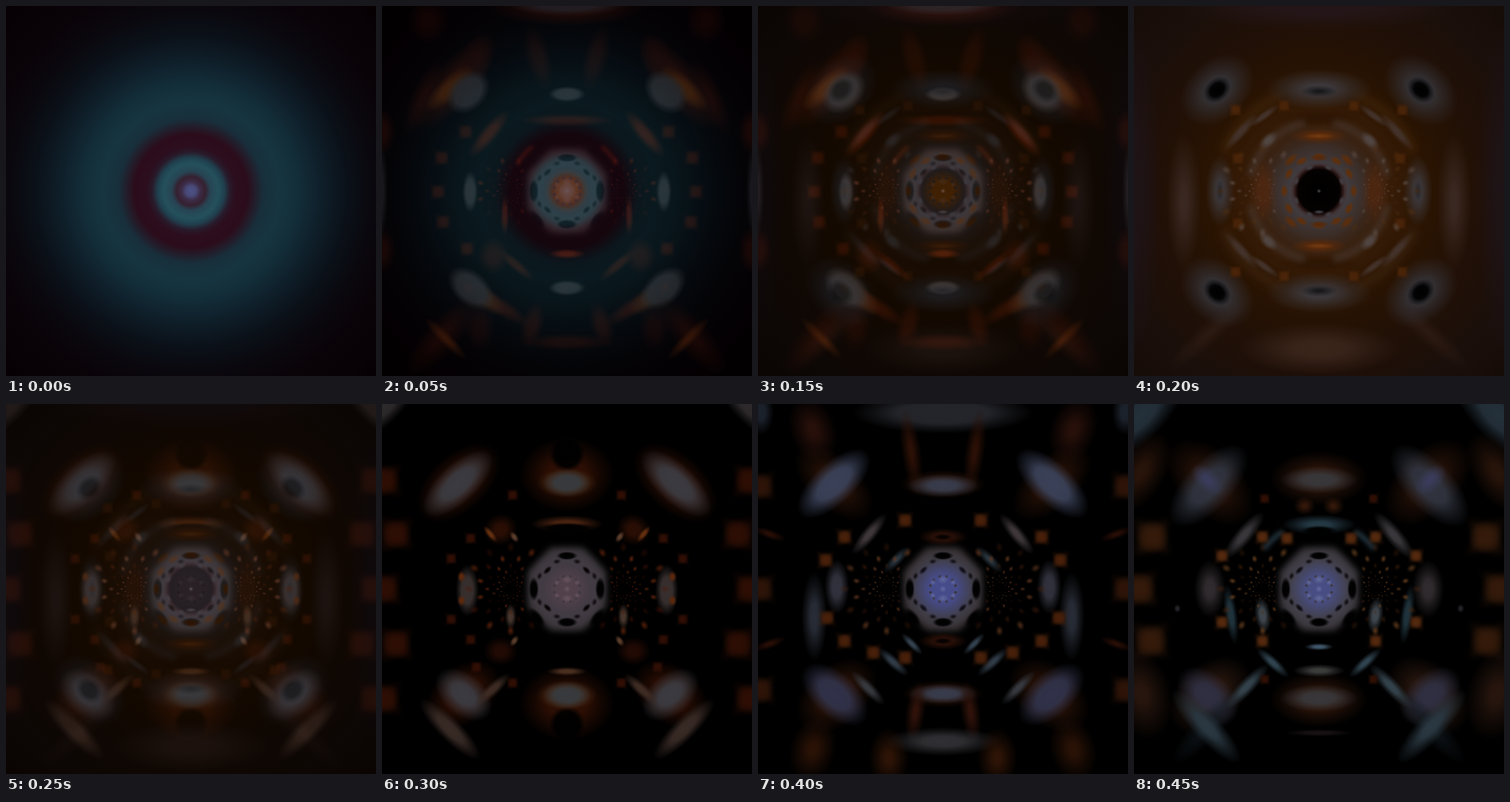
An HTML page with a canvas that plays this animation: 512 by 512 pixels, repeating every 500 ms.

```html
<!DOCTYPE html>
<html lang="en">
<head>
<meta charset="utf-8">
<title>Kaleidoscope pulse</title>
<style>
  html, body { margin: 0; width: 100%; height: 100%; overflow: hidden; background: #000; }
  canvas { display: block; width: 100vw; height: 100vh; }
</style>
</head>
<body>
<canvas id="stage" width="512" height="512"></canvas>
<script>
const SIZE = 512, MID = 256, STEP = 50;
const stage = document.getElementById('stage').getContext('2d');
let ctx;

// Coordinates are relative to the centre; everything off the axis is mirrored left to right.
function mirror(x, y, paint) {
  for (const side of x ? [1, -1] : [1]) {
    ctx.save();
    ctx.translate(MID + side * x, MID + y);
    ctx.scale(side, 1);
    paint();
    ctx.restore();
  }
}

// Fades smoothly from the core to the unit circle.
function glow(color, core) {
  const g = ctx.createRadialGradient(0, 0, 0, 0, 0, 1);
  g.addColorStop(0, color);
  g.addColorStop(core, color + 'f0');
  g.addColorStop((1 + core) / 2, color + '70');
  g.addColorStop(1, color + '00');
  return g;
}

function soft(x, y, rx, ry, deg, color, core = 0.35) {
  mirror(x, y, () => {
    ctx.rotate(deg * Math.PI / 180);
    ctx.scale(rx, ry);
    ctx.fillStyle = glow(color, core);
    ctx.beginPath();
    ctx.arc(0, 0, 1, 0, 7);
    ctx.fill();
  });
}

function quad(x, y, rx, ry, deg, color, core) {
  soft(x, y, rx, ry, deg, color, core);
  soft(x, -y, rx, ry, -deg, color, core);
}

function star(x, y, r, color) {
  mirror(x, y, () => {
    ctx.filter = `blur(${r * 0.12}px)`;
    ctx.scale(r, r);
    ctx.fillStyle = glow(color, 0.25);
    ctx.beginPath();
    ctx.moveTo(0.8, -0.8);
    for (const [px, py] of [[0.8, 0.8], [-0.8, 0.8], [-0.8, -0.8], [0.8, -0.8]]) {
      ctx.quadraticCurveTo((px + (px === py ? 0.8 : -0.8)) * 0.12, py * 0.12, px, py);
    }
    ctx.fill();
  });
  soft(x, y, r * 0.6, r * 0.6, 0, color, 0.1);
}

const stars = (points, r, color) => points.forEach(([x, y]) => star(x, y, r, color));

function arc(r, from, to, width, color) {
  mirror(0.001, 0, () => {
    ctx.filter = `blur(${width / 2}px)`;
    ctx.strokeStyle = color;
    ctx.lineWidth = width;
    ctx.beginPath();
    ctx.arc(0, 0, r, from * Math.PI / 180, to * Math.PI / 180);
    ctx.stroke();
  });
}

function backdrop(stops) {
  const g = ctx.createRadialGradient(MID, MID, 0, MID, MID, 362);
  for (const [r, color] of stops) g.addColorStop(r / 362, color);
  ctx.fillStyle = g;
  ctx.fillRect(0, 0, SIZE, SIZE);
}

// Rings of flecks around a pole on each side, uneven in brightness.
function poles(color, bright, reach = 7) {
  for (let k = 0; k < reach; k++) {
    const r = 10 * 1.34 ** k, size = Math.max(1.5, r * 0.12);
    for (let i = 0; i < 12; i++) {
      const a = (i + k % 2 / 2) * Math.PI / 6;
      const x = 78 + r * Math.cos(a), y = r * Math.sin(a);
      if (Math.hypot(x, y) < 62) continue;
      const noise = Math.abs(Math.sin(i * 12.9 + k * 78.2) * 437.5) % 1;
      ctx.globalAlpha = 0.15 + 0.65 * noise;
      soft(x, y, size * 1.1, size * 0.8, a * 180 / Math.PI, noise > 0.6 ? bright : color, 0.15);
    }
  }
  ctx.globalAlpha = 1;
}

// Hazy octagon with dark windows and a mottled eye.
function hub(rim, body, eye, eyeSize, fleck) {
  mirror(0, 0, () => {
    const g = ctx.createRadialGradient(0, 0, 15, 0, 0, 66);
    g.addColorStop(0, body);
    g.addColorStop(0.5, body);
    g.addColorStop(0.8, rim);
    g.addColorStop(1, rim + '60');
    ctx.filter = 'blur(4px)';
    ctx.fillStyle = g;
    ctx.beginPath();
    for (let i = 0; i < 8; i++) {
      const a = (i + 0.5) * Math.PI / 4;
      ctx.lineTo(59 * Math.cos(a), 63 * Math.sin(a));
    }
    ctx.fill();
  });
  soft(0, -46, 15, 6, 0, '#000000', 0.6);
  soft(0, 46, 15, 7, 0, '#000000', 0.6);
  soft(46, 0, 7, 17, 0, '#000000', 0.6);
  soft(42, 40, 8, 17, 38, '#000000', 0.5);
  quad(27, 26, 8, 4, -45, '#080404', 0.4);
  quad(38, 18, 4, 6, 20, '#100c0e', 0.2);
  quad(14, 38, 6, 4, -10, '#100c0e', 0.2);
  soft(0, 0, eyeSize, eyeSize, 0, eye, 0.45);
  for (let i = 0; i < 12; i++) {
    const a = (i + 0.5) * Math.PI / 6;
    soft(18 * Math.cos(a) || 0.01, 18 * Math.sin(a), 2.5, 2.5, 0, i % 2 ? rim : body, 0.2);
  }
  ctx.globalAlpha = 0.7;
  quad(0, 13, 8, 6, 0, fleck, 0.2);
  quad(14, 9, 4, 4, 0, fleck, 0.2);
  soft(0, 0, 5, 5, 0, fleck, 0.2);
  ctx.globalAlpha = 1;
}

// Black pupil with a scalloped edge inside pale rings.
function pupil(pale, dark, edge) {
  soft(0, 0, 70, 68, 0, pale, 0.55);
  for (let i = 0; i < 12; i++) {
    const a = i * Math.PI / 6;
    soft(48 * Math.cos(a) || 0.01, 48 * Math.sin(a), 9, 5, 90 + i * 30, dark, 0.3);
  }
  soft(0, 0, 40, 40, 0, edge, 0.7);
  soft(0, 0, 36, 37, 0, '#000000', 0.8);
  for (let i = 0; i < 8; i++) {
    const a = (i + 0.5) * Math.PI / 4;
    const x = 34 * Math.cos(a), y = 35 * Math.sin(a);
    if (x > 0) soft(x, y, 7, 4, 90 + (i + 0.5) * 45, pale, 0.3);
  }
  soft(0, 29, 8, 3, 0, pale);
  soft(0, 0, 3, 3, 0, pale);
}

function halo() {
  backdrop([
    [0, '#4c5286'], [7, '#484a78'], [13, '#3c2c46'], [20, '#35202f'], [27, '#274453'],
    [38, '#24505c'], [46, '#20404e'], [54, '#281a2a'], [62, '#2c0e1e'], [78, '#2c0c1b'],
    [88, '#241b29'], [100, '#182f3b'], [122, '#163540'], [148, '#132e39'], [178, '#0f202b'],
    [215, '#0b1119'], [255, '#0a070d'], [300, '#090207'], [362, '#070003']
  ]);
}

function embers() {
  backdrop([[0, '#000000'], [362, '#000000']]);
  const red = '#3a0e02', rust = '#2a0a02', amber = '#6a2e04', grey = '#3e3a3a';
  soft(0, -256, 110, 28, 0, red);
  soft(0, -258, 80, 15, 0, '#383438', 0.5);
  soft(258, 0, 10, 70, 0, '#2a2c30');
  quad(255, 82, 18, 32, 0, rust);
  soft(155, -150, 82, 30, 50, red, 0.3);
  soft(125, -182, 22, 40, -20, rust, 0.2);
  soft(198, -130, 18, 58, -25, rust, 0.2);
  soft(162, -142, 44, 16, 42, amber);
  soft(137, -137, 35, 26, 45, grey, 0.6);
  soft(95, 158, 52, 13, -32, red);
  soft(117, 146, 38, 16, -38, '#5a2a0c');
  soft(133, 135, 38, 24, -42, grey, 0.6);
  soft(136, 133, 10, 7, -42, '#4c3a32', 0.1);
  soft(172, 200, 70, 24, 48, rust, 0.2);
  soft(168, 204, 40, 9, -45, '#5c2404', 0.2);
  quad(0, 134, 26, 11, 0, grey, 0.6);
  soft(134, 1, 11, 29, 0, grey, 0.55);
  soft(0, -98, 66, 9, 0, red);
  soft(0, 87, 26, 7, 0, '#6a1e04');
  soft(108, -79, 42, 12, 50, '#501404');
  soft(71, 102, 34, 8, -40, red);
  arc(78, -52, -28, 5, '#4a1404');
  soft(86, 34, 6, 28, 0, '#4c1404');
  soft(0, 209, 66, 12, 0, rust);
  soft(48, 185, 16, 34, -15, rust);
  soft(40, -185, 18, 48, 15, '#200802');
  soft(192, -235, 28, 32, 0, '#1c0602');
  soft(121, 188, 22, 34, 0, '#1c0602');
  soft(102, 90, 22, 26, 0, rust);
  stars([[173, -46], [178, 1], [171, 43], [138, 80], [140, -82]], 17, red);
  poles('#3a0e02', '#5a1804', 6);
  hub('#443430', '#38353a', '#844204', 31, '#8a5a38');
}

function amberField() {
  backdrop([
    [0, '#3a2c28'], [65, '#3a2a22'], [95, '#381d08'], [150, '#2a1402'],
    [220, '#211006'], [300, '#1a0f0b'], [362, '#150b07']
  ]);
  const grey = '#3c393d', orange = '#58290a';
  soft(0, -256, 190, 34, 0, '#241618');
  soft(256, 0, 38, 230, 0, '#1e1316');
  soft(187, 15, 24, 96, 0, '#3a2822', 0.2);
  soft(0, 218, 110, 36, 0, '#3a251b', 0.3);
  soft(150, 195, 78, 16, 42, '#2c1a12', 0.1);
  arc(142, -68, -22, 12, '#3a2008');
  arc(142, 22, 68, 12, '#38200c');
  quad(0, 141, 74, 28, 0, grey, 0.25);
  quad(0, 138, 26, 8, 0, '#17171a', 0.2);
  quad(141, 140, 58, 42, -42, '#36363c', 0.25);
  quad(141, 140, 21, 16, -42, '#000000', 0.5);
  soft(137, 0, 20, 50, 0, grey, 0.25);
  soft(137, 0, 6, 16, 0, '#252326', 0.1);
  quad(0, 101, 62, 13, 0, '#2e1604');
  arc(96, -78, -12, 9, '#423127');
  arc(96, 12, 78, 9, '#423127');
  quad(0, 76, 40, 11, 0, orange);
  quad(0, 76, 22, 4, 0, '#713911', 0.2);
  soft(77, 0, 20, 46, 0, '#4c2610');
  quad(70, 70, 16, 9, -42, '#514642');
  quad(108, 82, 34, 8, -48, '#43322a');
  quad(76, 104, 26, 6, -36, '#43322a');
  stars([[112, -45], [112, 45], [115, -112], [115, 112], [48, 118], [48, -118]], 14, '#4a2408');
  poles('#55300f', '#5a4a42', 7);
  pupil('#403d42', '#5c300f', '#421008');
  quad(39, 43, 13, 6, -42, '#5a2d0c');
  quad(0, 46, 14, 5, 0, '#55290c');
}

function ashes() {
  backdrop([[0, '#000000'], [362, '#000000']]);
  const fringe = '#2e0f04', grey = '#3b3b41';
  soft(252, -252, 62, 22, 45, '#2e2a2b');
  stars([[252, -150], [236, -76], [252, 0], [236, 76], [252, 152]], 36, '#2e0e04');
  soft(150, -147, 70, 40, 42, fringe, 0.4);
  soft(151, -146, 62, 27, 43, grey, 0.45);
  soft(143, 146, 58, 40, 38, fringe, 0.4);
  soft(143, 146, 46, 29, -40, grey, 0.4);
  soft(162, 194, 58, 16, -45, '#382a25', 0.4);
  soft(103, 139, 32, 9, 42, '#3e2c24');
  quad(0, 158, 66, 52, 0, fringe, 0.4);
  quad(0, 187, 25, 25, 0, '#000000', 0.7);
  quad(0, 147, 42, 21, 0, '#482a12', 0.4);
  quad(0, 147, 34, 19, 0, '#373a3e', 0.5);
  soft(0, -90, 50, 12, 0, '#4c2411');
  soft(0, -84, 42, 8, 0, '#000000', 0.6);
  soft(0, 114, 28, 6, 0, '#4c3020');
  soft(138, 2, 16, 36, 0, '#38302f', 0.5);
  soft(146, -17, 6, 8, 0, '#5c280c');
  soft(146, 16, 6, 8, 0, '#5c280c');
  soft(92, -82, 24, 22, 30, '#2a0e04');
  soft(106, -76, 14, 5, -50, '#65300f');
  quad(73, 72, 5, 9, -35, '#5c3d2b');
  soft(78, 38, 8, 18, 0, '#48372e');
  soft(92, 86, 24, 20, 0, '#220a04');
  stars([[160, -42], [160, 42], [133, -70], [133, 70], [125, 108], [75, 130], [75, -130]], 13, '#300e04');
  poles('#4e1406', '#69270d');
  hub('#3a3639', '#423b44', '#52414b', 33, '#6c5963');
}

function violetField() {
  backdrop([
    [0, '#2b2935'], [65, '#2b2936'], [95, '#231d37'], [150, '#1c172d'],
    [220, '#201927'], [300, '#1e171f'], [362, '#171720']
  ]);
  const mist = '#343a49', rust = '#4a3034';
  soft(256, -5, 58, 130, 0, '#2b1c22', 0.3);
  soft(0, -198, 200, 30, 0, '#181329', 0.3);
  soft(0, 180, 190, 26, 0, '#18122b', 0.3);
  soft(0, -252, 120, 28, 0, '#2b303c');
  soft(252, -240, 60, 28, 42, '#222938');
  soft(184, 30, 22, 84, 6, mist, 0.2);
  soft(120, 38, 16, 65, 10, '#30364a', 0.2);
  soft(152, 198, 72, 18, -42, '#303542', 0.2);
  soft(0, 218, 105, 20, 0, '#2c303c', 0.2);
  soft(0, -150, 94, 28, 0, mist, 0.3);
  soft(0, 147, 94, 25, 0, mist, 0.3);
  quad(0, 139, 26, 9, 0, '#151519', 0.3);
  quad(148, 146, 58, 46, -42, '#2f2f37', 0.25);
  quad(148, 146, 23, 19, -42, '#2c1309', 0.5);
  quad(148, 146, 16, 13, -42, '#000000', 0.5);
  soft(143, 0, 22, 38, 0, '#33323b', 0.3);
  soft(143, 0, 8, 17, 0, '#130e0d', 0.3);
  quad(0, 81, 70, 15, 0, '#39364e', 0.3);
  arc(100, -76, -10, 8, '#303247');
  arc(100, 10, 76, 8, '#343850');
  arc(80, 18, 70, 6, '#41445a');
  quad(78, 102, 30, 4, 40, '#333f52');
  for (const y of [-1, 1]) {
    stars([[20, 125 * y], [76, 126 * y], [131, 114 * y], [176, 78 * y], [198, 32 * y]], 17, rust);
    stars([[180, 222 * y], [24, 218 * y], [76, 240 * y]], 28, '#3e292f');
    stars([[110, 45 * y], [100, 70 * y], [52, 94 * y], [140, 55 * y]], 11, '#54383c');
  }
  poles('#4b3d50', '#625160');
  pupil('#3b3b42', '#272634', '#481208');
  quad(42, 50, 16, 5, -42, '#484a58');
}

function sapphire() {
  backdrop([[0, '#000000'], [362, '#000000']]);
  const rust = '#2e1408', lead = '#383c4c';
  soft(0, -244, 125, 29, 0, '#25262c', 0.5);
  soft(180, -220, 32, 48, 20, '#28100a', 0.2);
  soft(252, -245, 18, 32, 0, '#1c222c');
  stars([[252, -142], [252, 0], [252, 140]], 32, '#2e1408');
  quad(240, 76, 24, 7, 20, '#2a0e06', 0.2);
  soft(44, -190, 14, 62, 8, '#2c1006', 0.2);
  soft(0, -145, 60, 20, 0, rust);
  soft(0, -143, 50, 16, 0, lead, 0.4);
  soft(0, 145, 56, 19, 0, rust);
  soft(0, 145, 48, 14, 0, lead, 0.4);
  soft(38, 170, 14, 44, -8, '#30120a', 0.2);
  soft(0, 211, 80, 20, 0, '#303034', 0.35);
  soft(75, 234, 28, 42, 0, '#2e1406', 0.2);
  soft(180, 222, 32, 46, -15, '#2a1206', 0.2);
  soft(151, -147, 68, 36, -43, rust, 0.2);
  soft(151, -146, 64, 29, 43, '#3a4158', 0.45);
  soft(147, 147, 64, 42, 40, rust, 0.3);
  soft(150, 146, 56, 31, -42, '#30324a', 0.45);
  soft(178, 38, 18, 62, 0, '#282c36', 0.3);
  soft(147, -3, 17, 38, 0, '#31323d', 0.4);
  soft(102, -76, 36, 10, 50, '#40383a', 0.3);
  soft(64, -41, 25, 8, 45, '#2c3842', 0.2);
  soft(104, 137, 32, 9, -45, '#36393f', 0.3);
  soft(69, 101, 28, 8, -42, '#303c48', 0.3);
  soft(43, 76, 20, 6, -45, '#344250', 0.3);
  quad(0, 72, 34, 12, 0, '#34140a', 0.3);
  quad(0, 72, 15, 5, 0, '#060202', 0.4);
  stars([[162, -40], [160, 40], [136, -72], [136, 72], [96, 88], [52, 95], [52, -95]], 18, '#48200a');
  poles('#48200c', '#64381e');
  hub('#383233', '#403e4a', '#464c8c', 42, '#6870a2');
}

function lagoon() {
  backdrop([[0, '#000000'], [362, '#000000']]);
  const rust = '#30160a';
  soft(248, -240, 80, 34, 45, '#24303a', 0.4);
  soft(246, -162, 34, 62, -30, '#28140a', 0.2);
  stars([[230, -72], [248, 0], [232, 72]], 40, '#341a0a');
  soft(246, 145, 42, 66, 15, '#28160e', 0.2);
  soft(151, -148, 74, 44, -45, rust, 0.2);
  soft(153, -143, 72, 34, 47, '#30343f', 0.4);
  soft(154, -151, 27, 16, -42, '#3a3c5c', 0.2);
  soft(151, 147, 66, 44, 42, '#2e1a10', 0.3);
  soft(154, 148, 50, 32, -42, '#2f2f42', 0.4);
  soft(154, 190, 68, 19, 47, '#121a20', 0);
  soft(156, 190, 68, 19, -47, '#2a3842', 0.3);
  quad(0, 153, 68, 38, 0, rust, 0.3);
  quad(0, 151, 54, 19, 0, '#38373a', 0.4);
  soft(0, 199, 48, 5, 0, '#181114');
  soft(20, -115, 15, 13, 0, '#34180a', 0.2);
  soft(0, -89, 52, 14, 0, '#253a46', 0.3);
  soft(0, -80, 26, 8, 0, '#000000', 0.6);
  soft(0, 113, 36, 9, 0, '#3c3e3c', 0.3);
  soft(0, 80, 20, 5, 0, '#40566a');
  soft(151, 0, 22, 40, 0, '#312c2f', 0.3);
  soft(104, -74, 42, 12, 50, '#3a383c', 0.3);
  soft(122, 35, 9, 42, 8, '#20343e');
  soft(78, 36, 11, 25, 8, '#40484f');
  soft(100, 135, 42, 11, 46, '#34434c', 0.3);
  soft(64, 102, 29, 8, -42, '#304450', 0.3);
  arc(94, -58, -36, 6, '#263a46');
  stars([[78, -72], [78, 72], [134, 46], [134, -46], [44, -70]], 16, '#54290e');
  soft(196, 27, 5, 6, 0, '#222428');
  stars([[75, 125], [75, -125]], 12, '#300f04');
  poles('#4e260e', '#704420');
  hub('#3a363a', '#42404b', '#484e84', 41, '#6a72a2');
}

const scenes = [halo, embers, amberField, ashes, violetField, sapphire, lagoon].map(draw => {
  const layer = document.createElement('canvas');
  layer.width = layer.height = SIZE;
  ctx = layer.getContext('2d');
  draw();
  return layer;
});

// Each step shows one scene or an even mix of two.
const steps = [[0], [0, 1], [1], [1, 2], [2], [2, 3], [3], [4], [5], [6]];

function render(now) {
  const [base, over] = steps[Math.floor(now / STEP) % steps.length];
  stage.globalAlpha = 1;
  stage.drawImage(scenes[base], 0, 0);
  if (over !== undefined) {
    stage.globalAlpha = 0.5;
    stage.drawImage(scenes[over], 0, 0);
  }
}

const start = performance.now();
function tick() {
  render(performance.now() - start);
  requestAnimationFrame(tick);
}
tick();
</script>
</body>
</html>
```
